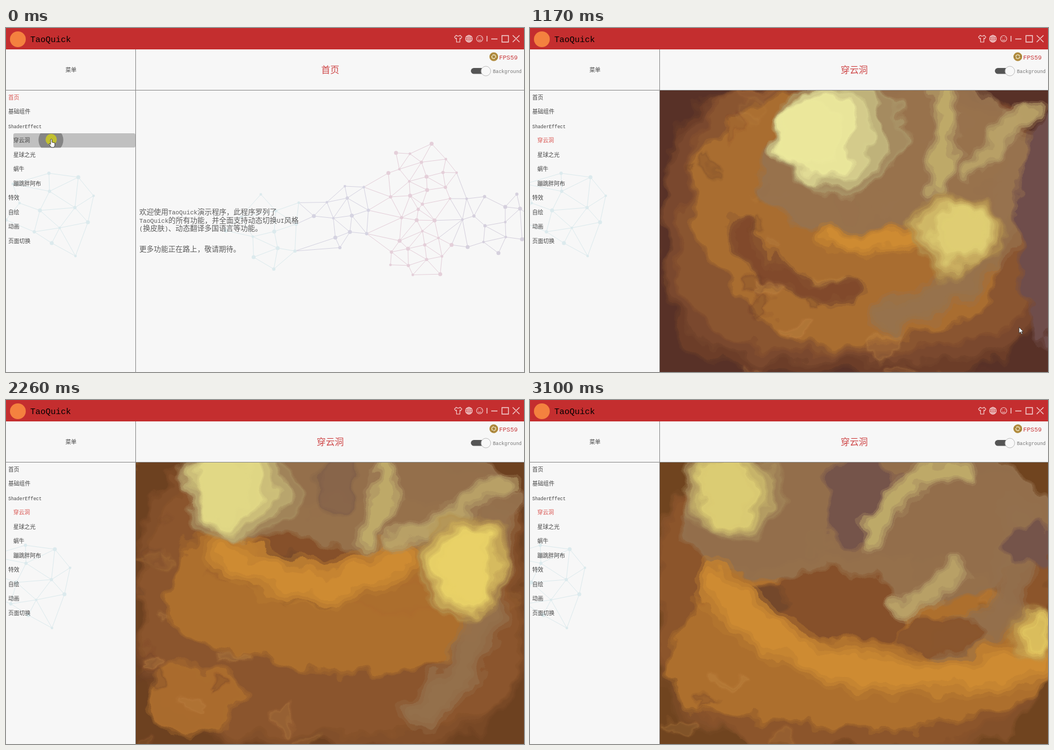
Write an HTML page with a canvas that moves like this. It is 917 px wide and 611 px high and loops after 3.2 s.

```html
<!DOCTYPE html>
<html lang="zh">
<head>
<meta charset="utf-8">
<title>TaoQuick</title>
<style>
html, body { margin: 0; width: 100%; height: 100%; overflow: hidden; background: #f7f7f7; }
svg, #cave { position: absolute; left: 0; top: 0; }
#cave { left: 230px; top: 111px; width: 687px; height: 500px; overflow: hidden; }
canvas { position: absolute; left: -20px; top: -20px; filter: url(#rough); }
text { font: 300 9.8px "Noto Sans CJK SC", "Noto Sans CJK JP", "Noto Sans CJK", sans-serif; fill: #444; }
.mono { font-family: "Liberation Mono", monospace; font-weight: 400; font-size: .84em; }
.mid { text-anchor: middle; }
.head { font-size: 16px; fill: #cf4a4b; }
.body text { font-size: 12.8px; fill: #5c5c5c; }
.icons { fill: none; stroke: #f3d3d3; stroke-width: 1.1; }
</style>
</head>
<body>
<svg width="917" height="611"><g id="net"></g></svg>
<div id="cave"><canvas id="view" width="727" height="540"></canvas></div>
<svg width="917" height="611">
  <defs>
    <filter id="rough" x="0" y="0" width="100%" height="100%" color-interpolation-filters="sRGB">
      <feTurbulence type="fractalNoise" baseFrequency=".018" numOctaves="3" seed="8" result="n"/>
      <feDisplacementMap in="SourceGraphic" in2="n" scale="55" xChannelSelector="R" yChannelSelector="G"/>
    </filter>
    <clipPath id="row"><rect x="13" y="187" width="216" height="25.5" rx="3"/></clipPath>
  </defs>
  <rect width="917" height="38" fill="#c42e2f"/>
  <circle cx="21" cy="20" r="14" fill="#f4813f"/>
  <text x="43" y="25" style="font-size:17.9px;fill:#000">TaoQuick</text>
  <g class="icons">
    <path d="M797 13l-3 3 2 3 1.500-1v7h6v-7l1.500 1 2-3-3-3q-3.500 3-7 0z"/>
    <circle cx="819.500" cy="19" r="6"/><ellipse cx="819.500" cy="19" rx="2.800" ry="6"/>
    <path d="M813.500 19h12M814.500 16h10M814.500 22h10M819.500 13v12"/>
    <circle cx="838.500" cy="19" r="5.500"/><path d="M836 17v1M841 17v1M836 21q2.500 2 5 0"/>
    <path d="M851.500 14v10M859 19.500h11M878 13.500h11.500v11.500h-11.500zM897 13l12 12M909 13l-12 12" stroke-width="1.400"/>
  </g>
  <path d="M229.500 38V611M0 110.500H917" stroke="#888"/>
  <text class="mid" x="115" y="77.500">菜单</text>
  <text class="mid head" id="title" x="574" y="80"></text>
  <g id="fps">
    <circle cx="863.500" cy="51" r="6" fill="#e9d9ae" stroke="#b08a3c" stroke-width="3.500"/>
    <circle cx="863.500" cy="51" r="2.500" fill="#a8873f"/>
    <path d="M859 47l2 2M868 55l-2-2" stroke="#7a6640"/>
  </g>
  <text x="873" y="55.500" style="font-size:13px;fill:#c8393b">FPS59</text>
  <rect x="823" y="71" width="34" height="10.500" rx="5.200" fill="#555"/>
  <circle cx="849.500" cy="76.500" r="8.500" fill="#f8f8f8" stroke="#bbb"/>
  <text x="862" y="79.500" style="font-size:10.100px;fill:#777">Background</text>
  <g id="hover" clip-path="url(#row)">
    <rect x="13" y="187" width="217" height="25.500" fill="#c0c0c0"/>
    <circle id="ripple" cx="79.500" cy="199" r="22" fill="#858585"/>
  </g>
  <g id="menu"></g>
  <g id="home" class="body">
    <text x="236" y="331">欢迎使用TaoQuick演示程序，此程序罗列了</text>
    <text x="236" y="345.500">TaoQuick的所有功能，并全面支持动态切换UI风格</text>
    <text x="236" y="360">(换皮肤)、动态翻译多国语言等功能。</text>
    <text x="236" y="397">更多功能正在路上，敬请期待。</text>
  </g>
  <g id="hand">
    <circle cx="80" cy="198" r="10" fill="#c2c030"/>
    <path d="M79 198q1.500-1.500 2.500 0v5l5 1v5l-1.500 3h-5l-4-6 1-1 2 2z" fill="#fff" stroke="#222" stroke-width=".8"/>
  </g>
  <path id="arrow" d="M0 0v10.500l2.500-2.300 1.800 4 1.700-.8-1.700-3.800h3.200z" fill="#fff" stroke="#222" stroke-width=".8"/>
</svg>
<script>
const $ = id => document.getElementById(id);
const mix = (a, b, u) => a + (b - a) * u;
const rand = i => { const v = Math.sin(i * 127.1 + 3.7) * 43758.5453; return v - Math.floor(v); };
const smooth = (a, b, x) => {
  const u = Math.min(1, Math.max(0, (x - a) / (b - a)));
  return u * u * (3 - 2 * u);
};
const LOOP = 3200, STEP = 77.5, OPEN = 150;

// Menu
const items = ['首页', '基础组件', 'ShaderEffect', '穿云洞', '星球之光', '蜗牛', '蹦跳胖阿布', '特效', '自绘', '动画', '页面切换'];
$('menu').innerHTML = items.map((s, i) =>
  `<text x="${i > 2 && i < 7 ? 13 : 4}" y="${126.5 + i * 25.5}">${s}</text>`).join('');
const rows = $('menu').children;
for (const el of document.querySelectorAll('text'))
  el.innerHTML = el.textContent.replace(/[!-~]+/g, '<tspan class="mono">$&</tspan>');

// Background network: a sidebar group, then seeded spiral clusters
const nodes = '12,277 76,258 128,265 155,298 122,319 145,345 123,405 77,290 60,324 95,355 50,362 81,382 24,311 0,341'
  .split(' ').map(s => { const [x, y] = s.split(','); return { x: +x, y: +y, c: '#dceaed' }; });
function cluster(c, cx, cy, rx, ry, n) {
  for (let i = 0; i < n; i++) {
    const a = i * 2.4 + rand(i + cx) * .5, r = Math.sqrt((i + .5) / n);
    nodes.push({ x: cx + rx * r * Math.cos(a), y: cy + ry * r * Math.sin(a), c });
  }
}
cluster('#dceaed', 460, 355, 80, 76, 12);
cluster('#d5d3e1', 600, 330, 62, 62, 12);
cluster('#e4cfd9', 732, 262, 74, 62, 17);
cluster('#e4cfd9', 730, 385, 66, 66, 17);
cluster('#d5d0dd', 870, 342, 78, 66, 15);

// Join two nodes when no other lies between them
const dist2 = (a, b) => (a.x - b.x) ** 2 + (a.y - b.y) ** 2;
let net = '';
nodes.forEach((a, i) => nodes.slice(0, i).forEach(b => {
  const d = dist2(a, b);
  if (d < 9500 && !nodes.some(n => n !== a && n !== b && dist2(n, a) + dist2(n, b) < d * .94))
    net += `<path d="M${a.x} ${a.y}L${b.x} ${b.y}" stroke="${a.c}"/>`;
}));
nodes.forEach((n, i) => net += `<circle cx="${n.x}" cy="${n.y}" r="${2.3 + i % 3 * .6}" fill="${n.c}"/>`);
$('net').innerHTML = net;

// Cave drawing helpers
const ctx = $('view').getContext('2d');
const rgb = h => [1, 3, 5].map(i => parseInt(h.slice(i, i + 2), 16));
function tint(a, b, u) {
  const k = Math.min(1, Math.max(0, u)), to = rgb(b);
  return '#' + rgb(a).map((v, i) => Math.round(mix(v, to[i], k)).toString(16).padStart(2, '0')).join('');
}

// Wavy ellipse with soft outer bands; square < 1 fills out the corners
function blob(color, cx, cy, rx, ry, { alpha = 1, square = 1, band = 7, wave = .05 } = {}) {
  const bend = v => Math.sign(v) * Math.abs(v) ** square;
  ctx.beginPath();
  for (let a = 0; a < 6.28; a += .07) {
    const r = 1 + wave * (Math.sin(3 * a + rx) + Math.sin(5 * a - ry) * .7);
    ctx.lineTo(cx + rx * r * bend(Math.cos(a)), cy + ry * r * bend(Math.sin(a)));
  }
  ctx.closePath();
  ctx.fillStyle = ctx.strokeStyle = color;
  for (const w of [band * 2, band]) {
    ctx.globalAlpha = alpha * .35;
    ctx.lineWidth = w;
    ctx.stroke();
  }
  ctx.globalAlpha = alpha;
  ctx.fill();
}

// Brush stroke from a through the pull of b to c, brighter along its middle
function sweep(rim, core, a, b, c, width, alpha = 1) {
  ctx.lineCap = 'round';
  for (let i = 0; i < 4; i++) {
    ctx.globalAlpha = alpha * (i ? .85 : .4);
    ctx.strokeStyle = tint(rim, core, i / 3);
    ctx.lineWidth = width * (1.25 - i * .27);
    ctx.beginPath();
    ctx.moveTo(...a);
    ctx.quadraticCurveTo(...b, ...c);
    ctx.stroke();
  }
}

// Nested blobs whose centre shifts by dx towards the core
function glow(rim, core, cx, cy, rx, ry, dx, alpha = 1) {
  for (let i = 0; i < 5; i++) {
    const z = 1 - i * .14;
    blob(tint(rim, core, i / 3), cx + dx * i / 4, cy, rx * z, ry * (.25 + .75 * z), { alpha: alpha * (i ? .9 : .6), band: 5, wave: .03 });
  }
}

// Small strokes drifting outwards from the light
function flecks(t, fx, fy) {
  for (let i = 0; i < 90; i++) {
    const life = (rand(i) + t * .00008) % 1, a = rand(i + 90) * Math.PI * 2, r = 120 + life * 430;
    blob(i % 2 ? '#6b3f28' : '#c08a48', fx + r * Math.cos(a), fy + r * Math.sin(a),
      6 + 22 * rand(i + 40), 5 + 16 * rand(i + 60), { alpha: .26 * Math.sin(life * Math.PI), band: 4, wave: .2 });
  }
}

function drawCave(t) {
  const p = (t - 700) / 2400, go = (a, b) => mix(a, b, p);
  const slide = 1 - (1 - p) ** 1.5;   // the light drifting off to the left
  const climb = smooth(0, .45, p);    // the view tilting up
  const dip = smooth(.4, .65, p);     // the floor opening
  const drop = smooth(.6, 1.05, p);   // the floor sinking
  const early = 1 - smooth(.2, .45, p);
  const lx = 620 - 260 * slide, ly = 215 - 105 * slide + 55 * p * p;

  ctx.setTransform(1, 0, 0, 1, -210, -91);
  ctx.globalAlpha = 1;
  ctx.fillStyle = tint('#4f2a2a', '#70441f', p * 1.4);
  ctx.fillRect(210, 91, 727, 540);

  // walls
  blob(tint('#673829', '#7a4a25', p * 1.4), 575, 360, go(332, 345), 250, { square: .5, wave: .01 });
  blob(tint('#76452f', '#83502a', p * 1.4), 577, go(345, 356), go(322, 344), go(246, 254), { square: .55, wave: .015 });
  blob(tint('#8a5531', '#8c552b', p), 577, go(335, 354), go(300, 342), go(236, 252), { square: .6, wave: .02 });
  blob(tint('#a36a35', '#ad6f2d', p * 3), 580, 325 + 115 * drop, 280 + 55 * drop, 228 - 78 * dip, { square: .85 });
  blob('#ab6c2e', 335, 530, 85, 62, { alpha: Math.max(0, 1 - Math.abs(p - .65) / .2) });
  sweep('#8b5530', '#80492b', [440 - 390 * climb * .45, 405 - 125 * climb],
    [500 - 200 * climb, 510 - 80 * climb], [610 - 110 * climb, 500 - 80 * climb], 28 + 20 * climb, 1 - dip);
  flecks(t, lx, ly);

  // mist, its tail on the right and the mauve shadows
  const mist = tint('#98724e', '#94704d', p);
  sweep(mist, mist, [865, 210], [880, 420], [640 + 100 * dip, 540 - 60 * climb + 80 * dip - 140 * drop], 62, .75);
  blob(mist, go(665, 605), 270 - 95 * climb + 40 * drop, go(218, 325), 190 - 85 * climb + 40 * drop, { alpha: .95 });
  blob('#6f4d4b', 907, 350, 36, 200, { alpha: early });
  blob('#75544a', 585, 150 + 25 * drop, 35 + 30 * drop, 55 + 25 * drop, { alpha: smooth(.5, .85, p) });
  blob('#75544a', 890, 260, 42, 28, { alpha: smooth(.88, 1, p), wave: .15 });

  // pit
  blob('#86502a', 525, 285 + 85 * drop, 100 + 45 * drop, 36 + 24 * drop, { alpha: dip, wave: .1 });
  blob('#74482b', 490 - 80 * drop, 292 + 70 * drop, 40, 24, { alpha: dip, wave: .15 });
  blob('#8a552d', 700 + 20 * drop, 350 + 70 * drop, 70, 26, { alpha: drop, wave: .15 });

  // bright floor
  const floor = [
    [600 - 275 * slide, 430 - 165 * climb + 55 * drop],
    [go(620, 500), 425 - 60 * climb + 200 * drop],
    [780 - 90 * climb + 215 * drop, 400 - 120 * climb + 190 * drop]
  ];
  sweep('#b97a30', '#d08c33', ...floor, 22 + 48 * climb);

  // light on the left, beams and the glow on the right
  glow(tint('#b0a274', '#a3885a', p), tint('#eeeea6', '#dccd74', p), lx, ly, go(122, 88), go(112, 80), go(-62, -10));
  sweep('#a98c60', '#c3b06a', [780 - 120 * climb + 115 * drop, 118],
    [go(765, 650), go(210, 125)], [765 - 160 * slide, 370 - 120 * smooth(0, .3, p)], 42, .8);
  const lift = smooth(0, .2, p), bx = 885 - 125 * drop, ex = 815 - 160 * slide;
  const by = 200 - 60 * lift + 160 * drop, ey = 340 - 90 * lift + 130 * drop;
  sweep('#a98d61', '#bda76a', [bx, by], [(bx + ex) / 2, (by + ey) / 2 + 15], [ex, ey], 36, .75);
  const end = smooth(.85, 1, p);
  glow('#b5924f', tint('#d8cc7c', '#e9d268', p * 2), 775 - 45 * climb + 80 * dip + 80 * end,
    410 - 115 * climb + 120 * drop, 42 + 42 * lift - 45 * end, 68 + 28 * dip - 50 * drop, 6, 1 - .6 * end);
}

// The pointer leaves the menu, then crosses the cave and goes out
function pointer(t) {
  const u = t < 700 ? (t - OPEN) / (700 - OPEN) : (t - 700) / 470;
  return t < 700 ? [mix(80, 608, u), mix(199, 441, u)] : [mix(608, 870, u), mix(441, 533, u)];
}

function render(t) {
  const open = t >= OPEN, active = open ? 3 : 0, [px, py] = pointer(t);
  const show = (id, on) => $(id).style.display = on ? '' : 'none';
  show('cave', open);
  show('home', !open);
  show('hand', !open);
  show('arrow', open && px < 930);
  show('hover', t < 320);
  $('net').setAttribute('transform', `translate(${-.019 * Math.max(0, t - 60)})`);
  $('arrow').setAttribute('transform', `translate(${px} ${py})`);
  $('fps').setAttribute('transform', `rotate(${t * .1125} 863.5 51)`);
  $('ripple').setAttribute('r', 22 + t * .25);
  $('ripple').style.opacity = Math.max(0, 1 - t / 300);
  [...rows].forEach((r, i) => r.style.fill = i === active ? '#d9534f' : '');
  $('title').textContent = items[active];
  if (open) drawCave(t);
}

let shown = -1;
const start = performance.now();
function tick() {
  const n = Math.floor((performance.now() - start) % LOOP / STEP);
  if (n !== shown) render((shown = n) * STEP);
  requestAnimationFrame(tick);
}
tick();
</script>
</body>
</html>
```
